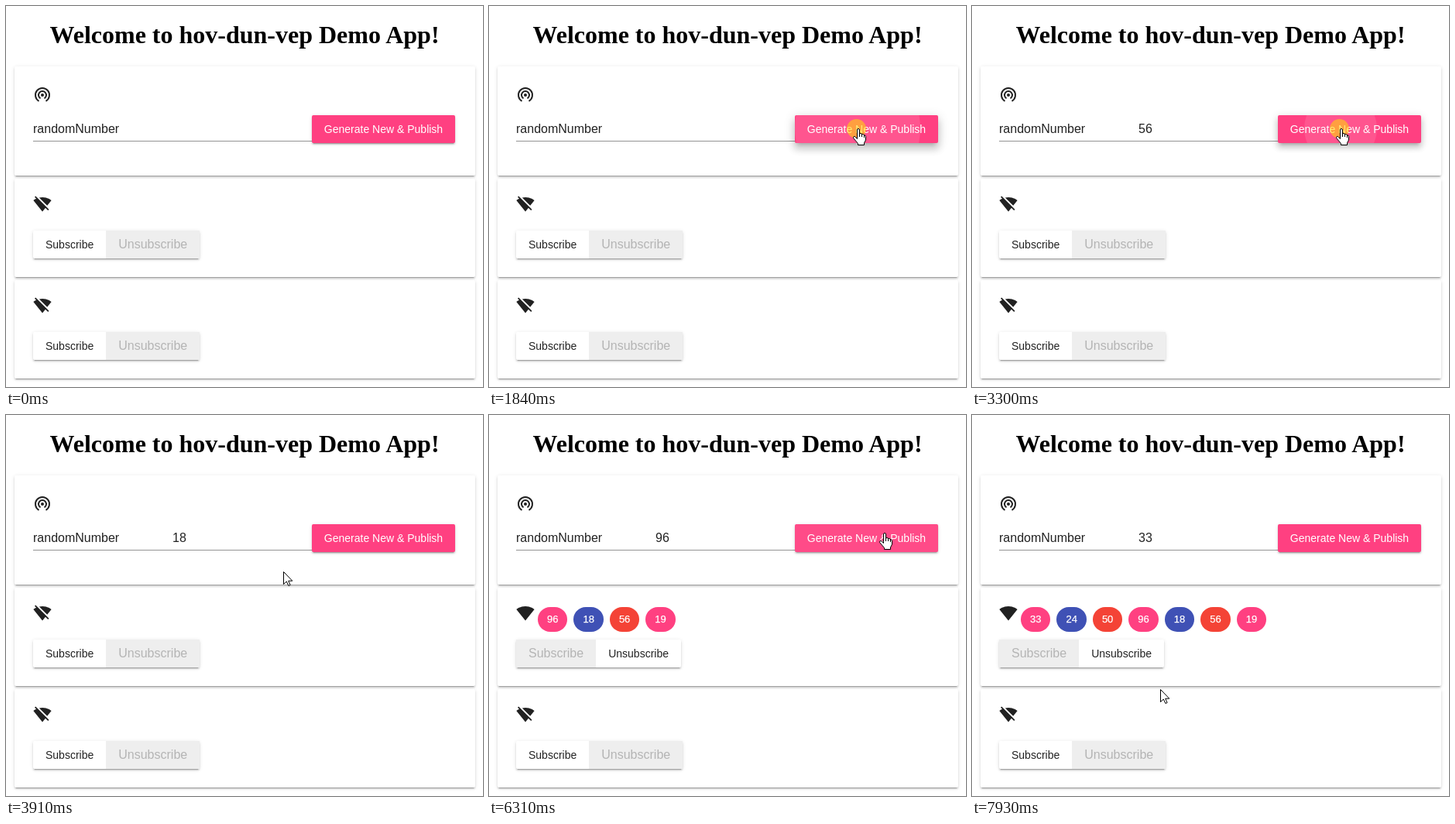
These frames come from a looping animation (616 px wide and 492 px high, 8 s). An HTML page:

```html
<!DOCTYPE html>
<html lang="en">
<head>
<meta charset="utf-8">
<title>Publish and subscribe demo</title>
<style>
  html, body { margin: 0; width: 100%; height: 100%; overflow: hidden; background: #fff; }
  body { position: relative; font: 16px "Liberation Sans", Arial, sans-serif; color: rgba(0,0,0,.87); }
  div, svg { position: absolute; white-space: nowrap; }
  h1 { position: absolute; top: 19px; width: 616px; margin: 0; text-align: center; color: #000;
       font: bold 32px/36px "Liberation Serif", "Times New Roman", serif; }
  .card { left: 11px; width: 595px; height: 127px; border-radius: 2px; background: #fff;
          box-shadow: 0 3px 1px -2px rgba(0,0,0,.2), 0 2px 2px rgba(0,0,0,.14), 0 1px 5px rgba(0,0,0,.12); }
  .field { top: 150px; line-height: 18px; }
  .rule { left: 35px; top: 174px; width: 360px; height: 1px; background: #949494; }
  #publish { left: 395px; top: 141px; width: 185px; height: 36px; border-radius: 2px; background: #ff4081; }
  #clip { inset: 0; overflow: hidden; border-radius: 2px; }
  #ripple { border-radius: 50%; background: #fff; }
  .label { inset: 0; text-align: center; color: #fff; font-size: 14px; line-height: 36px; }
  .icon { left: 24px; top: 21px; fill: #212121; }
  .group { left: 24px; top: 67px; display: flex; border-radius: 2px; overflow: hidden; }
  .toggle { left: 24px; top: 67px; display: flex; border-radius: 2px; line-height: 36px;
            box-shadow: 0 3px 1px -2px rgba(0,0,0,.2), 0 2px 2px rgba(0,0,0,.14), 0 1px 5px rgba(0,0,0,.12); }
  .toggle span { height: 36px; padding: 0 16px; font-size: 14px; }
  .toggle .off { font-size: 16px; background: #eee; color: #b4b4b4; }
  .chip { top: 25px; width: 38.46px; height: 32px; border-radius: 16px; color: #fff; text-align: center;
          font-size: 13px; line-height: 32px; -webkit-text-stroke: .25px #fff; }
  #halo { width: 25px; height: 25px; border-radius: 50%; background: rgba(255,220,0,.55); }
  #cursor { left: 0; top: 0; overflow: visible; fill: #fff; stroke: #000; }
</style>
</head>
<body>
<h1>Welcome to hov-dun-vep Demo App!</h1>
<div class="card" style="top:78px;height:141px">
  <svg class="icon" style="top:24px" width="24" height="24">
    <circle cx="12" cy="13" r="2"/>
    <path d="M9.5 17.33A5 5 0 1 1 14.5 17.33M7.5 20.79A9 9 0 1 1 16.5 20.79" fill="none" stroke="#212121" stroke-width="2"/>
  </svg>
</div>
<div class="field" style="left:35px">randomNumber</div>
<div class="field" id="value" style="left:215px"></div>
<div class="rule"></div>
<div id="publish">
  <div id="clip"><div id="ripple"></div></div>
  <div class="label">Generate New &amp; Publish</div>
</div>
<div class="card" id="first" style="top:223px"></div>
<div class="card" id="second" style="top:354px"></div>
<div id="halo"></div>
<svg id="cursor" width="20" height="24"><path id="shape"/></svg>

<script>
const $ = id => document.getElementById(id);
const LOOP = 8000;
const JOIN = [4680, 4830];                 // press and release on Subscribe
const CLICKS = [                           // press, release, number, chip colour
  [1670, 1920, 19, '#ff4081'], [2470, 2690, 56, '#f44336'], [3220, 3390, 18, '#3f51b5'],
  [5930, 6090, 96, '#ff4081'], [6390, 6550, 50, '#f44336'], [6780, 6940, 24, '#3f51b5'],
  [7180, 7330, 33, '#ff4081']
];
const MOVES = [                            // start, end, steps, x, y
  [530, 530, 1, 492, 370], [600, 660, 2, 473, 215], [830, 1360, 8, 476, 158],
  [3910, 3910, 1, 358, 202], [3990, 4530, 8, 94, 314], [5310, 5530, 4, 514, 153],
  [5700, 5760, 2, 510, 152], [7860, 7930, 2, 243, 354]
];
const ARROW = 'M.5 .5V16.5L4.3 13L6.9 18.5L9.1 17.5L6.7 12.2H11.8Z';
const HAND = 'M5.5 13.5V2Q5.5 .5 7 .5T8.5 2V7.5Q8.5 6.5 10 6.5T11.5 8Q12 7.3 13 7.5T14.5 9Q16.5 8.5 16.5 10.5V15' +
  'L14.5 19V21.5H6.5V19.5L3.5 16L.5 12.5Q.5 10 2.5 10.5ZM8.5 7V11M11.5 8V11M14.5 9V12';
const WIFI = 'M12 21.5L23.64 7C23.2 6.66 18.7 3 12 3S.8 6.66 .36 7Z';
const WIFI_OFF = 'M23.64 7C23.2 6.66 18.7 3 12 3Q9.8 3 7.85 3.48L18.18 13.8ZM17.04 15.22L3.27 1.44L2 2.72L4.05 4.78' +
  'Q1.8 5.8 .36 7L12 21.5L15.91 16.63L19.23 19.95L20.5 18.68Z';

const clamp = v => Math.max(0, Math.min(1, v));
const easeOut = p => 1 - (1 - clamp(p)) ** 3;

function subscriber(id, joined, chips) {
  const html = `<svg class="icon" width="24" height="24"><path d="${joined ? WIFI : WIFI_OFF}"/></svg>` +
    chips.map((c, i) => `<div class="chip" style="left:${52 + i * 46.46}px;background:${c[3]}">${c[2]}</div>`).join('') +
    `<div class="toggle"><span class="${joined ? 'off' : ''}">Subscribe</span>` +
    `<span class="${joined ? '' : 'off'}">Unsubscribe</span></div>`;
  const card = $(id);
  if (card.state !== html) card.innerHTML = card.state = html;
}

function pointer(t) {
  let x = MOVES[0][3], y = MOVES[0][4];
  for (const [start, end, steps, toX, toY] of MOVES) {
    if (t < start) break;
    const step = steps > 1 ? Math.floor((t - start) / ((end - start) / (steps - 1)) + .001) + 1 : 1;
    const k = Math.min(1, step / steps);
    x += (toX - x) * k;
    y += (toY - y) * k;
  }
  return [Math.round(x), Math.round(y)];
}

function drawButton(t, x, y) {
  const [press, release] = CLICKS.findLast(c => c[0] <= t) || [-9999, -9999];
  const e = t < release ? easeOut((t - press) / 280) : 1 - easeOut((t - release) / 280);
  $('publish').style.boxShadow =
    `0 ${3 + 2 * e}px ${1 + 4 * e}px ${-2 - e}px rgba(0,0,0,.2),` +
    `0 ${2 + 6 * e}px ${2 + 8 * e}px ${e}px rgba(0,0,0,.14),` +
    `0 ${1 + 2 * e}px ${5 + 9 * e}px ${2 * e}px rgba(0,0,0,.12)`;
  const cx = x - 395, cy = y - 141;
  const r = Math.hypot(Math.max(cx, 185 - cx), Math.max(cy, 36 - cy)) * easeOut((t - press) / 450);
  Object.assign($('ripple').style, {
    left: cx - r + 'px', top: cy - r + 'px', width: 2 * r + 'px', height: 2 * r + 'px',
    opacity: .11 * (1 - clamp((t - release - 100) / 250))
  });
}

function draw(t) {
  const [x, y] = pointer(t);
  const joined = t >= JOIN[1];
  const sent = CLICKS.filter(c => c[1] <= t).reverse();
  const within = (l, top, r) => x >= l && x < r && y >= top && y < top + 36;
  const hand = within(395, 141, 580) || !joined && within(35, 290, 129);

  $('value').textContent = sent.length ? sent[0][2] : '';
  drawButton(t, x, y);
  subscriber('first', joined, joined ? sent : []);
  subscriber('second', false, []);

  const pressed = [JOIN, ...CLICKS].some(c => t >= c[0] && t < c[1]);
  $('halo').style.display = pressed ? '' : 'none';
  $('halo').style.transform = `translate(${x - 14}px,${y - 12}px)`;
  $('shape').setAttribute('d', hand ? HAND : ARROW);
  $('cursor').style.display = t < MOVES[0][0] ? 'none' : '';
  $('cursor').style.transform = `translate(${hand ? x - 6 : x}px,${y}px)`;
}

const began = performance.now();
function tick() {
  draw((performance.now() - began) % LOOP);
  requestAnimationFrame(tick);
}
tick();
</script>
</body>
</html>
```
